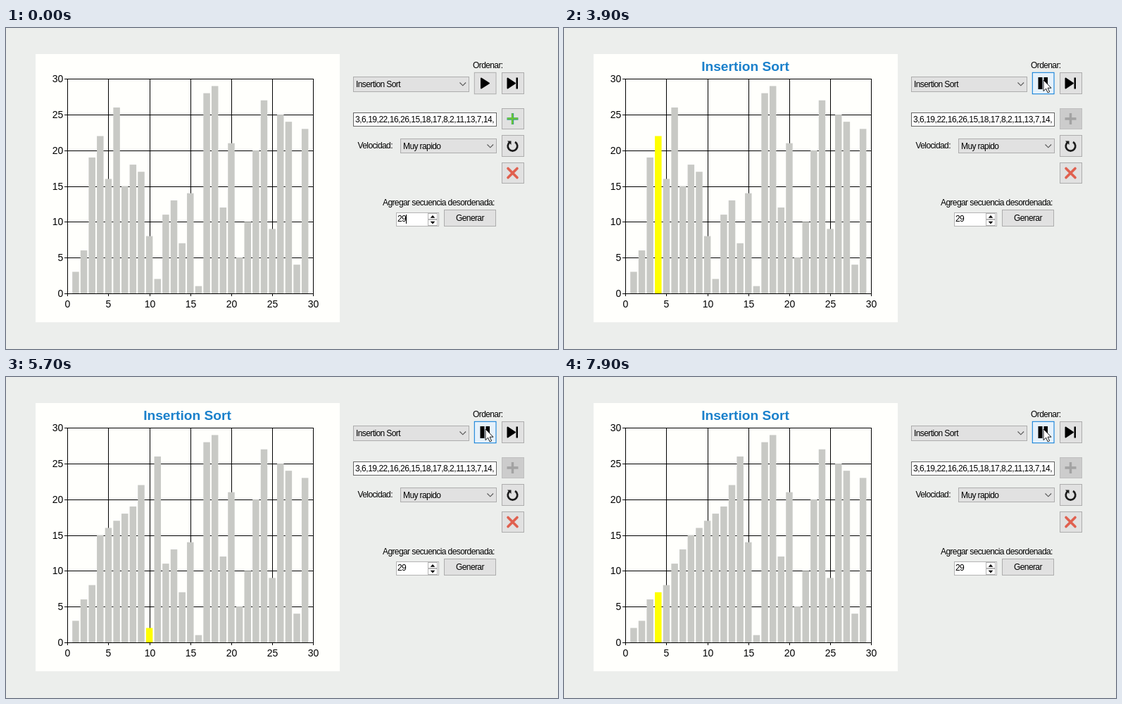
Animation of 784 by 456 pixels, one loop 8000 ms. Source, as an HTML page:

```html
<!DOCTYPE html>
<html lang="es">
<head>
<meta charset="utf-8">
<title>Insertion Sort</title>
<style>
  html, body { margin: 0; width: 100%; height: 100%; overflow: hidden; background: #eceeec; }
  svg { display: block; width: 784px; height: 456px; font: 12px "Liberation Sans", Arial, sans-serif; }
  .ui text { letter-spacing: -.6px; }
  .ui .list { letter-spacing: -.47px; }
  .box { fill: #e1e1e1; stroke: #adadad; }
  .field { fill: #fff; stroke: #666; }
  .spin { fill: #fff; stroke: #b4b4b4; }
  .chevron { fill: none; stroke: #555; stroke-width: 1.1; }
  .axis { font-size: 14px; }
  .title { font-size: 19.2px; font-weight: bold; fill: #1a80cb; text-anchor: middle; }
  #grid { stroke: #000; shape-rendering: crispEdges; }
  #bars { fill: #c8c9c5; }
  #bars .hot { fill: #ff0; }
  .hover .box { fill: #e5f1fb; stroke: #0078d7; }
  .running #play, #pause, .title { display: none; }
  .running #pause, .running .title { display: inline; }
  .running #add .box { fill: #ccc; stroke: #bfbfbf; }
  .running #add path { stroke: #a3a3a3; }
</style>
</head>
<body>
<svg id="stage" viewBox="0 0 784 456">
  <rect width="784" height="456" fill="#eceeec"/>
  <rect x="42" y="37" width="432" height="381" fill="#fffffc"/>
  <path id="grid" fill="none"/>
  <g id="bars"></g>
  <path d="M83 377.5H437" stroke="#000" shape-rendering="crispEdges"/>
  <g id="labels" class="axis"></g>
  <text class="title" x="257.5" y="61">Insertion Sort</text>

  <g class="ui">
    <text x="663" y="57">Ordenar:</text>
    <rect class="box" x="493.5" y="69.5" width="164" height="21"/>
    <text x="497" y="84">Insertion Sort</text>
    <path class="chevron" d="M644.5 77.5l4.3 4.3 4.3-4.3"/>

    <g id="run">
      <rect class="box" x="665.3" y="63.3" width="30.7" height="30.4"/>
      <path id="play" d="M675 71.5V85.5L686 78.5Z" stroke="#000" stroke-width="2" stroke-linejoin="round"/>
      <path id="pause" d="M673.5 70h6v17h-6zM681.5 70h5.5v17h-5.5z"/>
    </g>
    <rect class="box" x="704.5" y="63.5" width="31" height="30"/>
    <path d="M712.5 71.5V85.5L723 78.5Z" stroke="#000" stroke-width="2" stroke-linejoin="round"/>
    <path d="M724.5 70.5h2.5v16h-2.5z"/>

    <rect class="field" x="493.5" y="120.5" width="203" height="19"/>
    <text class="list" x="496" y="134">3,6,19,22,16,26,15,18,17,8,2,11,13,7,14,</text>
    <g id="add" fill="none">
      <rect class="box" x="704.5" y="114.5" width="31" height="29"/>
      <path d="M719.5 121V137M711.5 129H727.5" stroke="#3c9f8c" stroke-width="3.4"/>
      <path d="M719 121.5V136.5M712 128.5H727" stroke="#6cc72f" stroke-width="2"/>
    </g>

    <text x="499.5" y="171">Velocidad:</text>
    <rect class="box" x="560.5" y="157.5" width="136" height="20"/>
    <text x="564" y="172">Muy rapido</text>
    <path class="chevron" d="M683.5 165.5l4.3 4.3 4.3-4.3"/>

    <rect class="box" x="704.5" y="152.5" width="31" height="30"/>
    <path d="M723 162A6.8 6.8 0 1 1 716 162" fill="none" stroke="#1c1c1c" stroke-width="2.7"/>
    <path d="M712 160.5h5.5v5.5z" fill="#1c1c1c"/>

    <rect class="box" x="704.5" y="191.5" width="31" height="29"/>
    <path d="M713 199.5l13 13M726 199.5l-13 13" fill="none" stroke="#e0604f" stroke-width="3.6" stroke-linecap="round"/>

    <text x="535" y="252">Agregar secuencia desordenada:</text>
    <rect class="field spin" x="554.5" y="262.5" width="60" height="19"/>
    <text x="556" y="275">29</text>
    <path id="caret" d="M568.5 265V278" stroke="#000"/>
    <rect class="box spin" x="599.5" y="263.5" width="13" height="8"/>
    <rect class="box spin" x="599.5" y="272.5" width="13" height="8"/>
    <path d="M602.7 269.7h6.6l-3.3-3.6zM602.7 274.8h6.6l-3.3 3.6z"/>
    <rect class="box" x="622.5" y="258.5" width="73" height="23"/>
    <text x="639" y="274">Generar</text>
  </g>
  <path id="pointer" d="M0 0V15.6L3.6 12.2 6.1 17.8 8.6 16.7 6.1 11.2H11Z" fill="#fff" stroke="#000" stroke-width=".9"/>
</svg>
<script>
const NS = "http://www.w3.org/2000/svg";
const LOOP = 8000, FRAME = 100, TICK = 62.5, START = 3700, BAR = 9.5;
const values = [3, 6, 19, 22, 16, 26, 15, 18, 17, 8, 2, 11, 13, 7, 14, 1,
                28, 29, 12, 21, 5, 10, 20, 27, 9, 25, 24, 4, 23];
// pointer stops: time, x, y
const path = [[2500, 753, 320], [2600, 738, 240], [2700, 710, 140],
              [2800, 687, 80], [2900, 681, 68], [3000, 681, 74]];
const $ = id => document.getElementById(id);
const X = v => 87.3 + v * 349 / 30;
const Y = v => 376.8 - v * 304.5 / 30;

function make(parent, tag, attrs, text) {
  const el = document.createElementNS(NS, tag);
  for (const key in attrs) el.setAttribute(key, attrs[key]);
  if (text !== undefined) el.textContent = text;
  return parent.appendChild(el);
}

let lines = "";
for (let v = 0; v <= 30; v += 5) {
  const x = Math.round(X(v)) + .5, y = Math.round(Y(v)) + .5;
  lines += `M${x} 72V381M83 ${y}H437`;
  make($("labels"), "text", { x, y: 397, "text-anchor": "middle" }, v);
  make($("labels"), "text", { x: 81.3, y: y + 4.3, "text-anchor": "end" }, v);
}
$("grid").setAttribute("d", lines);

const bars = values.map((_, i) =>
  make($("bars"), "rect", { x: X(i + 1) - BAR / 2, width: BAR }));

// One step when an element is picked up, one for each swap.
function sortSteps(list) {
  const a = [...list], steps = [];
  const save = hot => steps.push({ list: [...a], hot });
  for (let i = 1; i < a.length; i++) {
    save(i);
    for (let j = i; j > 0 && a[j - 1] > a[j]; j--) {
      [a[j - 1], a[j]] = [a[j], a[j - 1]];
      save(j - 1);
    }
  }
  return steps;
}
const steps = sortSteps(values);
const idle = { list: values, hot: -1 };

function draw(t) {
  const running = t >= START;
  const tick = Math.floor((t - START) / TICK - 1.05);
  const { list, hot } = running && steps[tick] || idle;
  bars.forEach((bar, i) => {
    const top = Y(list[i]);
    bar.setAttribute("y", top);
    bar.setAttribute("height", 377 - top);
    bar.classList.toggle("hot", i === hot);
  });
  $("stage").classList.toggle("running", running);
  $("run").classList.toggle("hover", t >= 2800);
  $("caret").style.display = !running && (t + 250) % 1060 < 530 ? "" : "none";

  const stop = path.filter(p => p[0] <= t).pop();
  $("pointer").style.display = stop ? "" : "none";
  if (stop) $("pointer").setAttribute("transform", `translate(${stop[1]} ${stop[2]})`);
}

const origin = performance.now();
function loop() {
  const t = (performance.now() - origin) % LOOP;
  draw(Math.floor(t / FRAME) * FRAME);
  requestAnimationFrame(loop);
}
loop();
</script>
</body>
</html>
```
